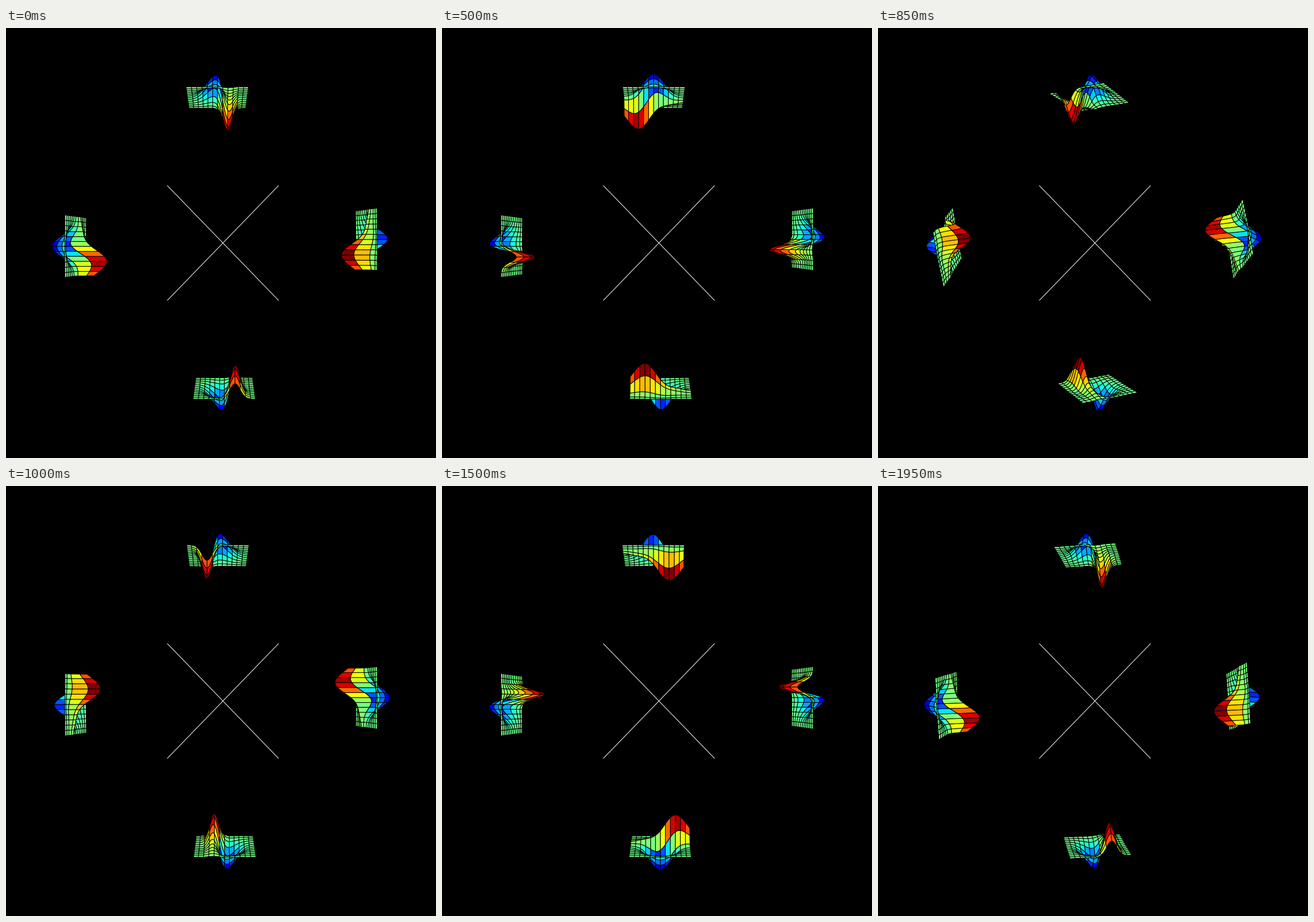
Write a matplotlib script that moves like this. It is 748 px wide and 748 px high and loops after 2000 ms.

```python
import numpy as np
import matplotlib.pyplot as plt
from matplotlib.animation import FuncAnimation
from matplotlib.collections import PolyCollection

SIZE, DPI = 748, 100
FRAMES, INTERVAL = 40, 50
STRIDE = 10
ELEV = np.radians(20)
DIST = 10
PX = 72 / DPI
CENTER = SIZE / 2
OFFSET = np.array([6.0, 246.4])      # lower view relative to the stage centre

# Every view fills a panel of this size; the cross marks the middle one
PANEL = SIZE * np.array([0.775, 0.8]) / 3
SCALE = PANEL * DIST / 1.85
LEFT, TOP = 280.75, (SIZE - PANEL[1]) / 2


def gauss(x, y, mx, my, sx, sy):
    r = ((x - mx) / sx) ** 2 + ((y - my) / sy) ** 2
    return np.exp(-r / 2) / (2 * np.pi * sx * sy)


def patch_outlines():
    """Outlines of the surface patches in box coordinates, and their mean heights."""
    t = np.arange(-3, 3, 0.05)
    x, y = np.meshgrid(t, t)
    z = 500 * (gauss(x, y, 1, 1, 1.5, 0.5) - gauss(x, y, 0, 0, 1, 1))
    box = np.stack([x / 6, y / 6, (z - 10) / 180], axis=-1)
    last = len(t) - 1
    outlines, heights = [], []
    for r in range(0, last, STRIDE):
        for c in range(0, last, STRIDE):
            r2, c2 = min(r + STRIDE, last), min(c + STRIDE, last)
            rows = np.r_[[r] * (c2 - c), r:r2, [r2] * (c2 - c), r2:r:-1]
            cols = np.r_[c:c2, [c2] * (r2 - r), c2:c:-1, [c] * (r2 - r)]
            outlines.append(box[rows, cols])
            heights.append(z[rows, cols].mean())
    return outlines, np.array(heights)


def project(p, azim):
    """Perspective view: screen points (y down) and distance from the eye."""
    ca, sa = np.cos(azim), np.sin(azim)
    right = p[:, 1] * ca - p[:, 0] * sa
    front = p[:, 0] * ca + p[:, 1] * sa
    up = p[:, 2] * np.cos(ELEV) - front * np.sin(ELEV)
    depth = DIST - front * np.cos(ELEV) - p[:, 2] * np.sin(ELEV)
    return SCALE * np.column_stack([right, -up]) / depth[:, None], depth.mean()


outlines, heights = patch_outlines()
norm = plt.Normalize(heights.min(), heights.max())
colors = plt.get_cmap("jet")(norm(heights))

fig = plt.figure(figsize=(SIZE / DPI, SIZE / DPI), dpi=DPI, facecolor="black")
ax = fig.add_axes([0, 0, 1, 1])
ax.set_xlim(0, SIZE)
ax.set_ylim(SIZE, 0)
ax.axis("off")

bottom = TOP + PANEL[1]
for ends in ((TOP, bottom), (bottom, TOP)):
    ax.plot((LEFT, LEFT + PANEL[0]), ends, color="white", lw=PX)

views = [PolyCollection([], edgecolors="black", linewidths=PX) for _ in range(4)]
for view in views:
    ax.add_collection(view, autolim=False)


def update(i):
    # Quarter turns of the stage: bottom, left, top, right
    for q, view in enumerate(views):
        azim = np.radians(360 * i / FRAMES - 90 * q)
        c, s = [(1, 0), (0, 1), (-1, 0), (0, -1)][q]
        turn = np.array([[c, s], [-s, c]])
        shapes = [project(p, azim) for p in outlines]
        order = np.argsort([-d for _, d in shapes], kind="stable")
        view.set_verts([(shapes[k][0] + OFFSET) @ turn + CENTER for k in order])
        view.set_facecolor(colors[order])
    return views


anim = FuncAnimation(fig, update, frames=FRAMES, interval=INTERVAL,
                     repeat=True, repeat_delay=0, blit=False)
plt.show()
```
